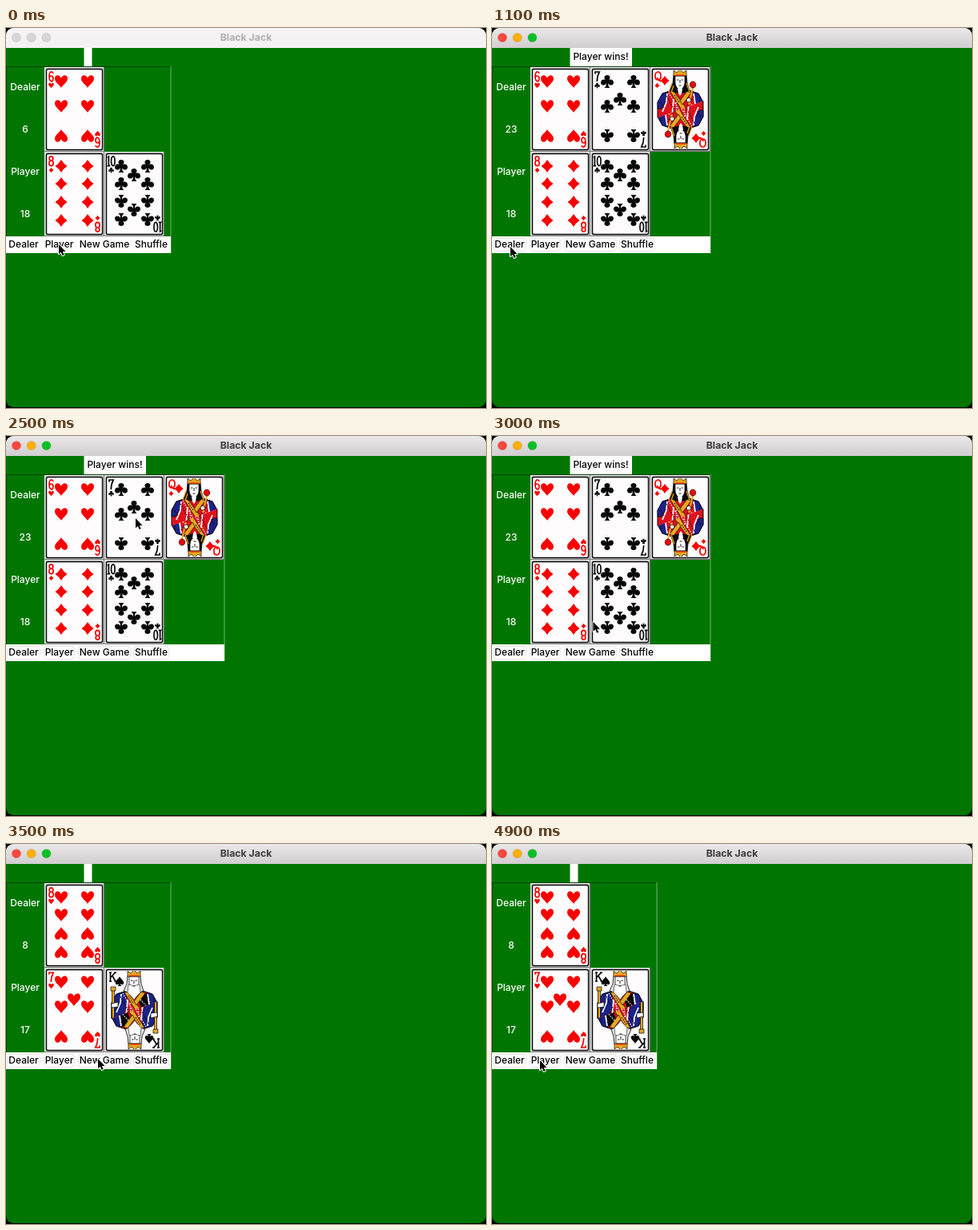
An HTML page with a canvas for the animation above (5000 ms loop, 600 px wide and 476 px high).

```html
<!DOCTYPE html>
<html lang="en">
<head>
<meta charset="utf-8">
<title>Black Jack</title>
<style>
html, body { margin: 0; height: 100%; overflow: hidden; background: #000; }
canvas { display: block; }
</style>
</head>
<body>
<canvas id="stage" width="600" height="476"></canvas>
<script>
const ctx = document.getElementById('stage').getContext('2d');
const LOOP = 5000, STEP = 100;
const RED = '#f80000', BLACK = '#080808', GOLD = '#e9a820', BLUE = '#1c2288', GREEN = '#007600';
const CARD_W = 75, CARD_H = 106;

// Pointer keys: time, x, y
const POINTER = [
  [0, 66, 271], [600, 23, 274], [1600, 23, 274], [2400, 162, 103], [2600, 162, 103],
  [3200, 114, 278], [3400, 115, 269], [3600, 115, 269], [4000, 77, 278], [4100, 72, 281],
  [4500, 57, 271], [4600, 57, 271], [4900, 60, 271], [5000, 60, 271]
];
const ARROW = 'M0 0V12.2L2.8 9.7 4.7 14 6.7 13.1 4.8 9H8.5Z';

// Suit shapes, about 16 units across, centred on the origin
const SUITS = {
  heart: 'M0 8C-2 4-8 1-8-3.5C-8-9-1.5-9 0-4C1.5-9 8-9 8-3.5C8 1 2 4 0 8Z',
  diamond: 'M0-8Q3-3 7.5 0Q3 3 0 8Q-3 3-7.5 0Q-3-3 0-8Z',
  club: 'M-1-1C-5-4-4-8 0-8S5-4 1-1C4-4 8-2 8 1.5S3 6 1 2Q1 6 3.5 8H-3.5Q-1 6-1 2C-3 6-8 5-8 1.5S-4-4-1-1Z',
  spade: 'M0-8C2-4 7-1 7 2.5S2.5 6.5 1 3.5Q1.2 6.5 3.5 8H-3.5Q-1.2 6.5-1 3.5C-2.5 6.5-7 6-7 2.5S-2-4 0-8Z'
};

// Condensed card indices drawn as strokes
const RANKS = {
  6: 'M6 3C5-.5 1 0 1 6.5C1 14.3 6 14.3 6 9.5C6 5 1.6 5 1 8.5',
  7: 'M1 3.5V1H6.2C4 5 3.3 9 3.3 13',
  8: 'M3.5 .8C.4 .8 .4 6 3.5 6S6.6 .8 3.5 .8M3.5 6C0 6 0 12.7 3.5 12.7S7 6 3.5 6',
  10: 'M-1.2 2L.4 1V12.4M-1.5 12.6H2.3M5.8 .8C2.8 .8 2.8 12.6 5.8 12.6S8.8 .8 5.8 .8',
  Q: 'M4.5 1C-.3 1-.3 11 4.5 11S9.3 1 4.5 1M3.5 8Q6 13.5 9 12',
  K: 'M1 1H4M2.5 1V12M1 12H4M7 1H10M8.5 1L3 7M4.8 5L9 12M7.5 12H10.5'
};

// Pip places on a card
const L = 21, M = 37, R = 54;
const row = y => [[L, y], [R, y]];
const PIPS = {
  6: [...row(18), ...row(49), ...row(86)],
  7: [...row(18), [M, 40], ...row(49), ...row(86)],
  8: [...row(18), ...row(40), ...row(63), ...row(86)],
  10: [...row(18), [M, 29], ...row(40), ...row(62), [M, 73], ...row(85)]
};

const FIRST = { dealer: [[6, 'heart']], player: [[8, 'diamond'], [10, 'club']], sums: [6, 18] };
const LOST = { ...FIRST, dealer: [[6, 'heart'], [7, 'club'], ['Q', 'diamond']], sums: [23, 18], message: 'Player wins!' };
const SECOND = { dealer: [[8, 'heart']], player: [[7, 'heart'], ['K', 'spade']], sums: [8, 17] };

const BUTTONS = [['Dealer', 1, 43], ['Player', 47, 86], ['New Game', 90, 156], ['Shuffle', 159, 204]];

function rect(x, y, w, h, color) {
  ctx.fillStyle = color;
  ctx.fillRect(x, y, w, h);
}

function paint(path, fill, stroke, width = 1) {
  const args = path ? [new Path2D(path)] : [];
  if (fill) { ctx.fillStyle = fill; ctx.fill(...args); }
  if (stroke) { ctx.strokeStyle = stroke; ctx.lineWidth = width; ctx.stroke(...args); }
}

function round(x, y, w, h, r, fill, stroke, width) {
  ctx.beginPath();
  ctx.roundRect(x, y, w, h, r);
  paint(null, fill, stroke, width);
}

function at(x, y, draw) {
  ctx.save();
  ctx.translate(x, y);
  draw();
  ctx.restore();
}

function text(value, x, y, color, font = '500 12px') {
  ctx.font = `${font} Inter, sans-serif`;
  ctx.textAlign = 'center';
  ctx.fillStyle = color;
  ctx.fillText(value, x, y + 4.3);
}

const ink = suit => suit === 'heart' || suit === 'diamond' ? RED : BLACK;

function pip(suit, x, y, size, flip) {
  at(x, y, () => {
    ctx.scale(size, flip ? -size : size);
    paint(SUITS[suit], ink(suit));
  });
}

// Draws the upper half of a card, then again turned by 180 degrees
function twice(draw) {
  draw();
  at(CARD_W, CARD_H, () => {
    ctx.rotate(Math.PI);
    draw();
  });
}

function robe(queen) {
  paint('M27 29Q37 35 48 29L60 33 66 44V68H9V44L15 33Z', '#e0101c', BLACK);
  const sleeve = queen ? 'M15 33L22 31 20 42 14 52H9V44Z' : 'M15 33L26 30 29 46 21 66H9V44Z';
  paint(sleeve, BLUE, BLACK, .7);
  paint('M60 33L53 31 56 46 60 56H66V44Z', BLUE, BLACK, .7);
  if (!queen) paint('M46 31L55 33 58 62H50L43 42Z', BLACK);
  paint('M25 31L29 30 51 60H43Z', GOLD, BLACK, .7);
  paint('M46 30L51 32 40 47 37 42Z', GOLD, BLACK, .7);
  paint('M21 33L20 44 15 56M54 33L56 46 61 56M29 40L27 62', null, '#fff', 1.8);
  ctx.setLineDash([1.5, 1.5]);
  paint('M23 32L42 64M45 40L56 52M32 44L33 58', null, '#fff', 1.3);
  paint('M20 36L35 63M54 37L43 54M30 35L36 44M62 38L62 50M13 44L17 52', null, BLACK, 1.3);
  ctx.setLineDash([]);
}

function head(queen) {
  paint('M29 10L28 20 24 29 32 32H42L49 29 46 20 45 10Z', queen ? BLACK : '#ddd', BLACK, .8);
  if (queen) paint('M27 20L23 31M29 23L26 32M45 20L49 31', null, GOLD, 1.3);
  paint('M31 11H43V20Q42 27 37 28Q32 27 31 20Z', '#fff', BLACK, .7);
  if (queen) paint('M34 27H40L39 33 37 36 35 33Z', '#fff');
  else paint('M30 21Q37 24 44 21L45 31 40 36 37 40 34 36 29 31Z', '#fff', '#555', .8);
  paint('M33 16H35.5M38.5 16H41M37 16V20M35.5 23H38.5', null, BLACK, .9);
  paint('M29 11L29 4 33 7 37 3 41 7 45 4 45 11Z', GOLD, BLACK, .7);
  paint('M31 10H43', null, RED, 1.2);
}

function court(queen, suit) {
  ctx.save();
  ctx.beginPath();
  ctx.moveTo(5, 4); ctx.lineTo(70, 4); ctx.lineTo(70, 41); ctx.lineTo(5, 65);
  ctx.clip();
  robe(queen);
  head(queen);
  if (queen) {
    paint('M53 26L48 47', null, GOLD, 2);
    paint('M53 18C58 18 58 26 53 26S48 18 53 18Z', RED, BLACK, .7);
    paint('M45 40L49 38 51 43 46 44Z', '#fff', BLACK, .7);
  } else {
    paint('M11 27V66', null, BLACK, 3.6);
    paint('M11 27V66', null, GOLD, 2.2);
    paint('M8 24H14V29H8Z', GOLD, BLACK, .7);
    paint('M9 45L17 43V49L9 50Z', '#fff', BLACK, .7);
  }
  ctx.restore();
  pip(suit, queen ? 18 : 19, 17, .75);
}

function card([rank, suit], x, y) {
  at(x, y, () => {
    rect(0, 0, CARD_W, CARD_H, '#777');
    rect(0, 0, CARD_W - 1, CARD_H - 1, '#eee');
    rect(1, 1, CARD_W - 2, CARD_H - 2, '#c8c8c8');
    round(2.5, 2.5, 70, 101, 2, '#fefcfd', BLACK, 1.4);
    const face = !PIPS[rank];
    twice(() => {
      if (face) court(rank === 'Q', suit);
      at(5, 5, () => paint(RANKS[rank], null, ink(suit), 1.7));
      if (rank !== 'K') pip(suit, 8.5, 23, .42);
    });
    if (!face) for (const [px, py] of PIPS[rank]) pip(suit, px, py, 1, py > 52);
  });
}

function titleBar(active) {
  const shade = ctx.createLinearGradient(0, 0, 0, 25);
  shade.addColorStop(0, active ? '#eae8e9' : '#f6f3f4');
  shade.addColorStop(1, active ? '#d0cecf' : '#f4f1f2');
  rect(0, 0, 600, 25, shade);
  const lights = active ? ['#ff473d', '#ffae05', '#08c125'] : Array(3).fill('#d8d5d6');
  lights.forEach((color, i) => {
    ctx.beginPath();
    ctx.arc(13 + i * 18.7, 12, 5.6, 0, 7);
    paint(null, color, 'rgba(0,0,0,.12)', .8);
  });
  text('Black Jack', 300, 12, active ? '#3d3b3c' : '#b0adae', '700 12.3px');
}

function table({ dealer, player, sums, message }, active, pressed) {
  const right = message ? 272.5 : 205.5;
  rect(97.5, 25, message ? 77.5 : 10, 23, '#fff');
  if (message) text(message, 136, 36, '#000');
  rect(0, 48, right, 1, '#003c00');
  rect(0, 48, 1, 213, '#003c00');
  rect(right, 48, 1, 213, '#74b074');
  ['Dealer', sums[0], 'Player', sums[1]].forEach((label, i) => text(label, 24, 74 + i * 53, '#fff'));
  dealer.forEach((c, i) => card(c, 48 + i * CARD_W, 49));
  player.forEach((c, i) => card(c, 48 + i * CARD_W, 49 + CARD_H));
  rect(0, 261, right + .7, 21, '#fff');
  for (const [label, x1, x2] of BUTTONS) {
    if (label === pressed) round(x1, 262, x2 - x1, 19, 4, '#0a66ec');
    else if (active) round(x1 + .5, 263.5, x2 - x1 - 1, 16, 4, '#fff', '#e4e4e4');
    text(label, (x1 + x2) / 2, 271, '#000');
  }
}

function pointer(t) {
  const i = POINTER.findIndex(key => key[0] > t);
  const [t0, x0, y0] = POINTER[i - 1], [t1, x1, y1] = POINTER[i];
  const p = (t - t0) / (t1 - t0), e = p * p * (3 - 2 * p);
  at(x0 + (x1 - x0) * e, y0 + (y1 - y0) * e, () => {
    ctx.lineJoin = 'round';
    paint(ARROW, null, '#fff', 2);
    paint(ARROW, '#000');
  });
}

function draw(now) {
  const t = Math.floor(now % LOOP / STEP) * STEP;
  const game = t < 1100 ? FIRST : t < 3500 ? LOST : SECOND;
  const pressed = t === 1000 ? 'Dealer' : t === 3400 ? 'New Game' : '';
  rect(0, 0, 600, 476, '#000');
  ctx.save();
  ctx.beginPath();
  ctx.roundRect(0, 0, 600, 475, 9);
  ctx.clip();
  rect(0, 0, 600, 476, GREEN);
  titleBar(t >= 1000);
  table(game, t >= 1000, pressed);
  ctx.restore();
  pointer(t);
  requestAnimationFrame(() => draw(performance.now() - start));
}

const start = performance.now();
draw(0);
</script>
</body>
</html>
```
